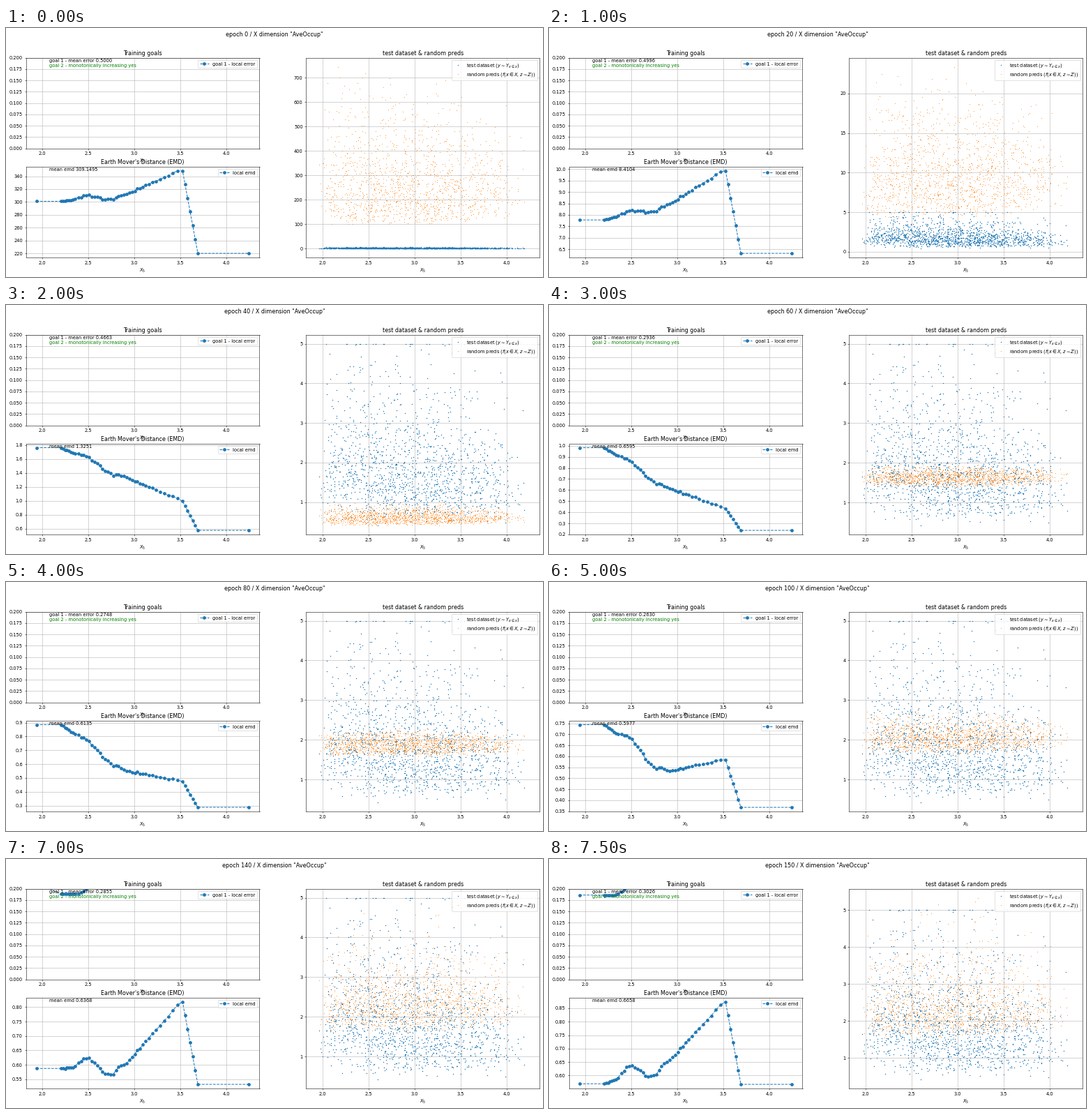
A matplotlib script for the animation above (8 s loop, 770 px wide and 357 px high).

```python
import numpy as np
import matplotlib.pyplot as plt
from matplotlib.animation import FuncAnimation

W, H, DPI = 770, 357, 48
FRAMES, INTERVAL = 16, 500
STEP = 10
N = 1400
X_MIN, X_MAX = 1.935, 4.245

plt.rcParams["font.family"] = "DejaVu Sans"

# Training state at a few epochs; everything between is interpolated
EPOCHS = [0, 20, 40, 60, 80, 120, 150]
LOG_TRACKS = {
    "start": [301, 7.78, 1.76, 0.983, 0.885, 0.626, 0.569],
    "middle": [311, 8.43, 1.335, 0.617, 0.552, 0.51, 0.65],
    "peak": [351, 10, 1, 0.436, 0.477, 0.723, 0.88],
    "end": [220, 6.32, 0.575, 0.237, 0.288, 0.469, 0.567],
    "mean_emd": [309.1495, 8.4104, 1.3251, 0.6595, 0.6135, 0.5824, 0.6658],
    "pred": [280, 10.3, 0.64, 1.66, 1.91, 2.34, 2.46],
}
LINEAR_TRACKS = {
    "mean_err": [0.5, 0.4996, 0.4663, 0.2936, 0.2748, 0.2512, 0.3026],
    "spread": [0.466, 0.39, 0.21, 0.085, 0.085, 0.14, 0.2],
}


def state(epoch):
    s = {k: np.exp(np.interp(epoch, EPOCHS, np.log(v)))
         for k, v in LOG_TRACKS.items()}
    s.update((k, np.interp(epoch, EPOCHS, v)) for k, v in LINEAR_TRACKS.items())
    s["late"] = np.clip((epoch - 80) / 40, 0, 1)
    s["final"] = np.clip((epoch - 120) / 30, 0, 1)
    return s


# Positions of the local windows along x
t = np.linspace(0, 1, 13)
xs = np.concatenate([
    [X_MIN],
    np.linspace(2.2, 2.355, 8),
    np.linspace(2.39, 3.003, 22),
    3.033 + 0.49 * (0.65 * t + 0.35 * t ** 2),
    np.linspace(3.55, 3.69, 6),
    [X_MAX],
])

# Test dataset: income-like values capped at 5
rng = np.random.default_rng(5)
px = X_MIN + (X_MAX - X_MIN) * rng.beta(1.7, 2.2, N)
right = np.clip((px - 3.2) / 0.8, 0, 1)
median = 1.9 - 0.22 * (px - 2.5) - 0.1 * right
real = median * np.exp((0.48 - 0.08 * right) * rng.normal(size=N))
real = np.clip(real, 0.42 + rng.uniform(0, 0.4, N), 5)
real[0] = 0.42
wobble = rng.uniform(-0.012, 0.012, xs.size) * ((xs > 2.21) & (xs < 3.5))


def padded(lo, hi):
    pad = 0.05 * (hi - lo)
    return lo - pad, hi + pad


def emd_curve(s):
    y = np.interp(xs, [2.2, 2.9, 3.52, 3.69],
                  [s["start"], s["middle"], s["peak"], s["end"]])
    wave = np.sin(4 * np.pi * (xs - 2.35)) * ((xs > 2.35) & (xs < 2.85))
    return y + np.ptp(y) * (wobble + (0.04 + 0.07 * s["late"]) * wave)


def err_curve(s):
    # Flat trough that widens to the left, with parabolic sides
    floor = 0.28 - 0.088 * s["late"] - 0.006 * s["final"]
    lo = 2.47 - 0.535 * s["final"]
    hi = 2.47 - 0.17 * s["final"]
    gap = np.maximum(np.maximum(lo - xs, xs - hi), 0)
    return floor + 0.8 * gap ** 2


def predictions(s, seed):
    z = 4.2 * np.random.default_rng(seed).beta(2.4, 2.8, N) - 2.1
    z *= 1 - 0.25 * right
    z *= 2.1 / z.max()
    skew = 0.05 * s["late"] + 0.35 * s["final"] ** 0.5
    return s["pred"] * np.exp(s["spread"] * z * (1 + skew * np.maximum(z, 0)))


fig = plt.figure(figsize=(W / DPI, H / DPI), dpi=DPI, facecolor="white")


def panel(left, top, bottom, title):
    ax = fig.add_axes([left / W, 1 - bottom / H, 335 / W, (bottom - top) / H])
    ax.set_title(title)
    ax.set_xlabel("$X_5$")
    ax.set_xlim(padded(X_MIN, X_MAX))
    ax.grid(True)
    return ax


ax_goal = panel(28.5, 42.6, 172.6, "Training goals")
ax_emd = panel(28.5, 198.6, 329, "Earth Mover's Distance (EMD)")
ax_data = panel(430.4, 42.6, 329, "test dataset & random preds")
ax_goal.set_ylim(0, 0.2)

heading = fig.text(0.5, 0.987, "", size=12, ha="center", va="top")
err_line, = ax_goal.plot(xs, xs, "o--", color="C0", label="goal 1 - local error")
emd_line, = ax_emd.plot(xs, xs, "o--", color="C0", label="local emd")
ax_data.plot(px, real, "o", color="C0", ms=2.1, mew=0,
             label=r"test dataset ($y \sim Y_{x \in x}$)")
dots, = ax_data.plot(px, real, "o", color="C1", ms=1.5, mew=0,
                     label=r"random preds ($f(x \in X, z \sim Z)$)")


def note(ax, y, text="", color="black"):
    return ax.text(0.1, y, text, color=color, transform=ax.transAxes)


err_text = note(ax_goal, 0.95)
note(ax_goal, 0.895, "goal 2 - monotonically increasing yes", "green")
emd_text = note(ax_emd, 0.95)

for ax in (ax_goal, ax_emd, ax_data):
    ax.legend(loc="upper right")


def update(i):
    epoch = STEP * i
    s = state(epoch)
    heading.set_text(f'epoch {epoch} / X dimension "AveOccup"')
    err_text.set_text(f"goal 1 - mean error {s['mean_err']:.4f}")
    emd_text.set_text(f"mean emd {s['mean_emd']:.4f}")
    err_line.set_ydata(err_curve(s))

    emd = emd_curve(s)
    emd_line.set_ydata(emd)
    ax_emd.set_ylim(padded(emd.min(), emd.max()))

    pred = predictions(s, 100 + i)
    dots.set_ydata(pred)
    both = np.concatenate([real, pred])
    ax_data.set_ylim(padded(both.min(), both.max()))
    return ()


anim = FuncAnimation(fig, update, frames=FRAMES, interval=INTERVAL,
                     repeat=True, repeat_delay=0, blit=False)
plt.show()
```
